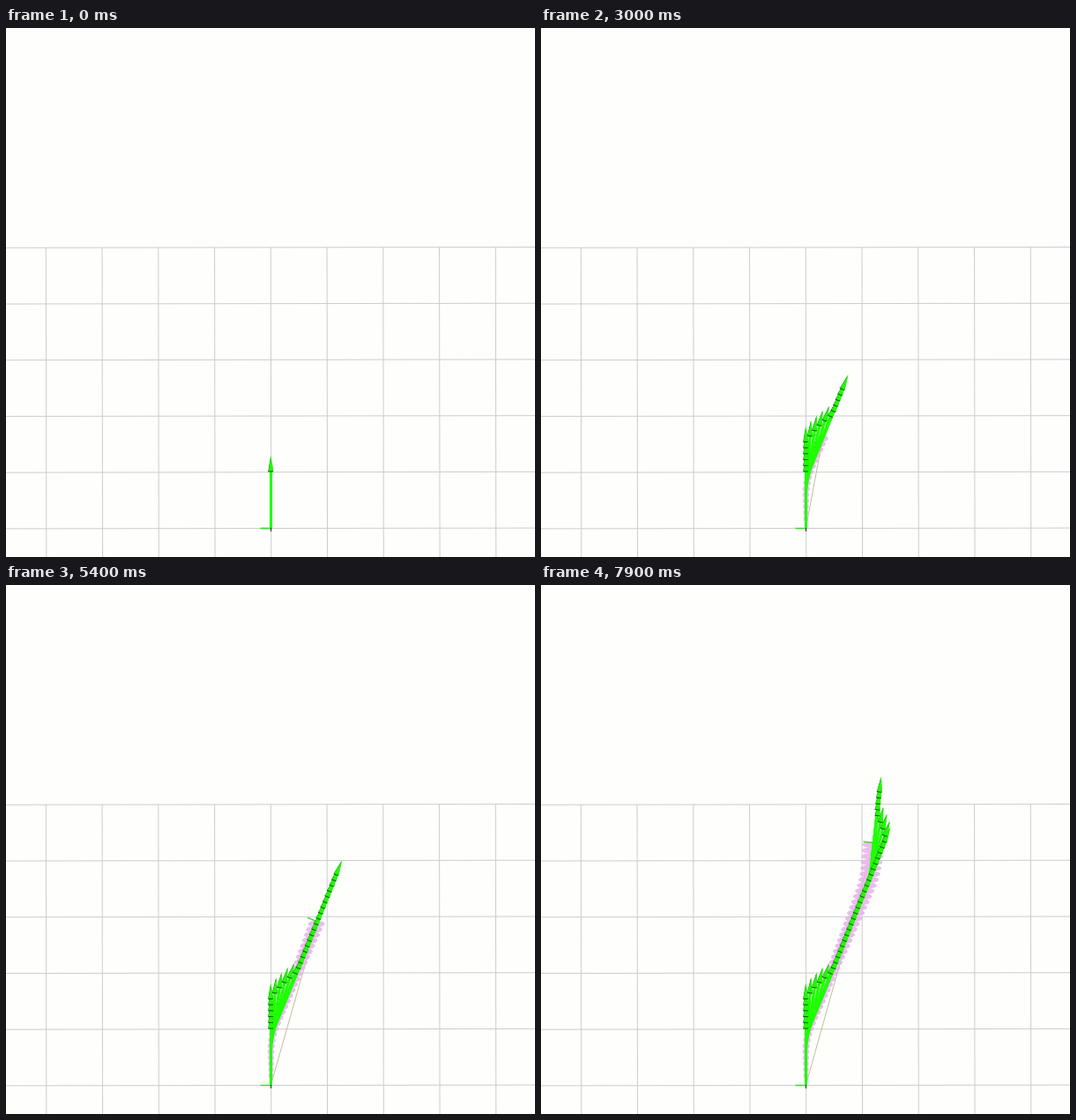
These frames come from a looping animation (600x600 px, 8000 ms). A matplotlib script:

```python
import numpy as np
import matplotlib.pyplot as plt
from matplotlib.animation import FuncAnimation
from matplotlib.patches import Ellipse, Polygon

SIZE, DPI = 600, 100
FRAMES, INTERVAL = 80, 100
PX = 72 / DPI
ORIGIN = np.array([300.5, 567])

# Drive: wait, go straight, bear right, go straight, bear back left
START, STEP_TIME, STEP_LENGTH = 0.23, 0.18, 6.72
TURN_RATE, TURN_RIGHT, TURN_LEFT = 4.2, 22, 15.5
STEPS = np.arange(44)

ARROW, HEAD = 82, 17.5
NECK = ARROW - HEAD


def heading(step):
    """Angle from straight up, in radians."""
    right = np.clip(TURN_RATE * (step - 5), 0, TURN_RIGHT)
    left = np.clip(TURN_RATE * (step - 34.5), 0, TURN_LEFT)
    return np.radians(right - left)


def directions(step):
    a = heading(step)
    forward = np.array([np.sin(a), -np.cos(a)])
    return forward, np.array([-forward[1], forward[0]])


moves = STEP_LENGTH * directions(STEPS[:-1])[0].T
PATH = ORIGIN + np.vstack([[0, 0], np.cumsum(moves, axis=0)])


def position(step):
    return np.array([np.interp(step, STEPS, PATH[:, i]) for i in (0, 1)])


fig = plt.figure(figsize=(SIZE / DPI, SIZE / DPI), dpi=DPI, facecolor="#fefefd")
ax = fig.add_axes([0, 0, 1, 1])
ax.set(xlim=(0, SIZE), ylim=(SIZE, 0))
ax.axis("off")


def line(xs, ys, color, width, z):
    return ax.plot(xs, ys, color=color, lw=width * PX, zorder=z,
                   solid_capstyle="butt")[0]


def add_grid():
    for i in range(-4, 5):
        x = 300.5 + 63.75 * i
        line([x - 0.2, x + 0.3], [248.7, 600], "#cdcdcd", 1, 1)
    for i in range(6):
        y = 248.9 + 63.72 * i
        line([0, 600], [y + 0.4, y - 0.4], "#cdcdcd", 1, 1)


def add_arrow(step):
    base = position(step)
    forward, right = directions(step)

    def outline(points, color, z):
        xy = [base + along * forward + side * right for along, side in points]
        return ax.add_patch(Polygon(xy, fc=color, ec="none", zorder=z))

    def box(start, end, half, color, z):
        corners = [(start, -half), (end, -half), (end, half), (start, half)]
        return outline(corners, color, z)

    # Shaded back faces, then the lit shaft and head
    return [
        box(-4, 0, 0.8, "#16301a", 5),
        box(0, NECK, 1.6, "#1eff00", 10),
        outline([(NECK - 1, -3.3), (NECK - 1, 2.7), (ARROW - 1, -0.4)],
                "#0f5208", 20 + step),
        outline([(NECK, -2.9), (NECK, 2.9), (ARROW, 0)],
                "#22f805", 20.5 + step),
    ]


def add_spread(step):
    center = position(step) + 4 * directions(step)[0]
    return ax.add_patch(Ellipse(center, 5 + 0.5 * step, 7.4, fc="#e6b2ea",
                                ec="none", alpha=0.85, zorder=3))


add_grid()
line([288, 301], [567.2, 567.2], "#2fdc22", 1.4, 4)
link = line([], [], "#bdbb94", 0.9, 2)
axis = line([], [], "#35dc30", 1.4, 4)
trail = [add_arrow(k) + ([add_spread(k)] if k else []) for k in STEPS]


def update(frame):
    step = max((frame * INTERVAL / 1000 - START) / STEP_TIME, 0)
    for k, parts in enumerate(trail):
        for part in parts:
            part.set_visible(k <= step)
    forward, right = directions(step)
    base = position(step) + min(step, 2) * forward
    left = base - 12 * right
    axis.set_data([base[0], left[0]], [base[1], left[1]])
    link.set_data([ORIGIN[0], base[0]], [ORIGIN[1], base[1]])
    return [link, axis]


anim = FuncAnimation(fig, update, frames=FRAMES, interval=INTERVAL,
                     repeat=True, repeat_delay=0)
plt.show()
```
